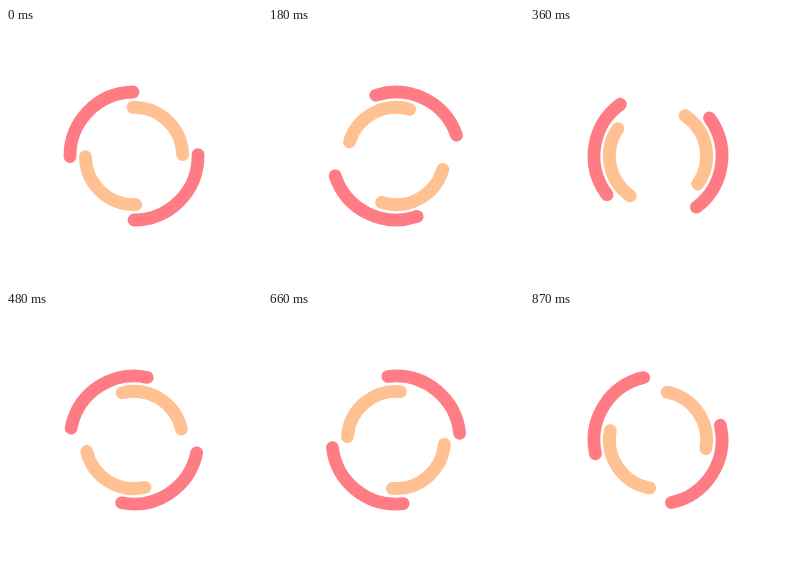
These frames come from a looping animation (256x256 px, 0.9 s). An HTML page:

```html
<!DOCTYPE html>
<html lang="en">
<head>
<meta charset="utf-8">
<title>Double ring spinner</title>
<style>
  html, body { margin: 0; width: 100%; height: 100%; overflow: hidden; background: #fff; }
  svg { display: block; width: 100%; height: 100%; }
  circle { fill: none; stroke-width: 5; stroke-linecap: round; }
</style>
</head>
<body>
<svg viewBox="-50 -50 100 100">
  <circle id="outer" r="25" stroke="#ff7c85" pathLength="4" stroke-dasharray="1"/>
  <circle id="inner" r="19" stroke="#ffc192" pathLength="4" stroke-dasharray="1"/>
</svg>
<script>
  const PERIOD = 900;
  const outer = document.getElementById('outer');
  const inner = document.getElementById('inner');
  const turn = (ring, degrees) => ring.setAttribute('transform', `rotate(${degrees})`);

  function draw() {
    const angle = performance.now() % PERIOD / PERIOD * 360;
    turn(outer, angle);
    turn(inner, 90 - angle);
    requestAnimationFrame(draw);
  }
  draw();
</script>
</body>
</html>
```
